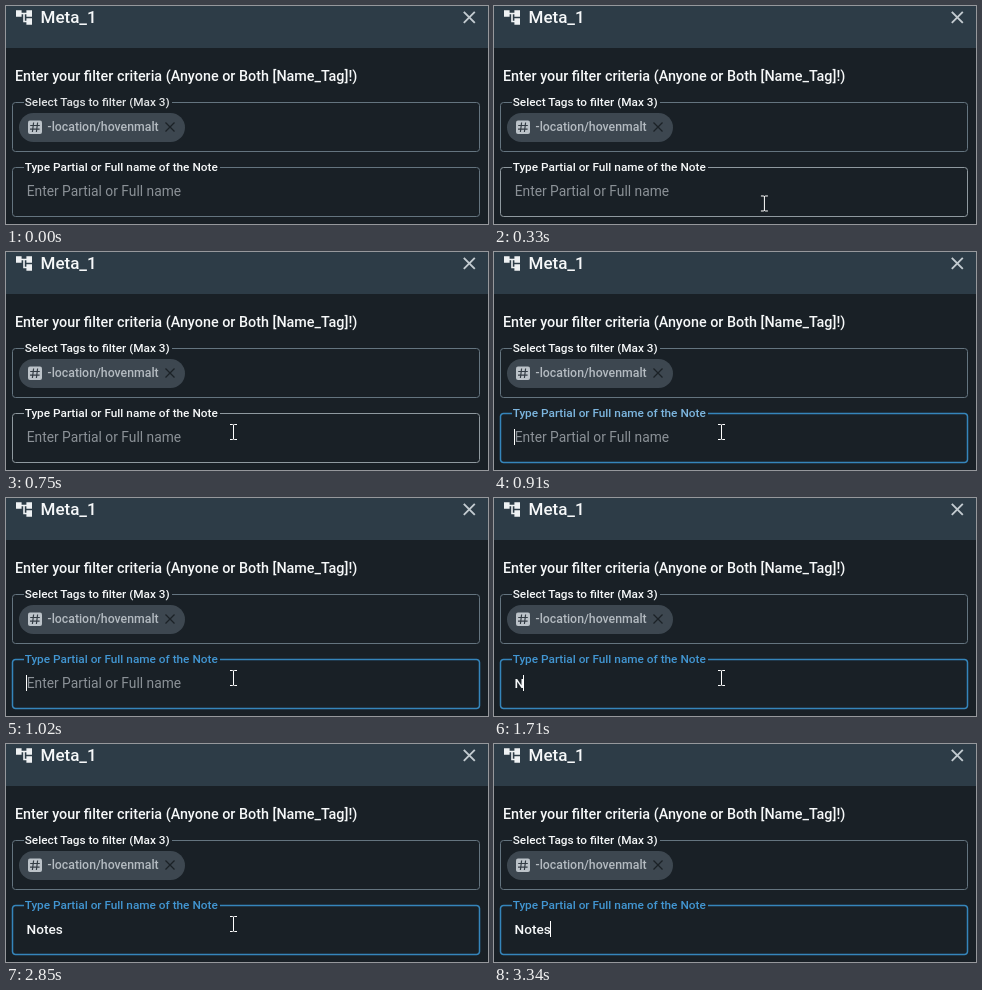
An HTML page that plays this animation: 482 by 218 pixels, repeating every 3.5 s.

```html
<!DOCTYPE html>
<html lang="en">
<head>
<meta charset="utf-8">
<title>Filter dialog</title>
<style>
  html, body { margin: 0; width: 100%; height: 100%; overflow: hidden; background: #192026; }
  svg { display: block; width: 482px; height: 218px; font-family: Roboto, sans-serif; font-weight: 500; }
  text { fill: #f6f8f9; white-space: pre; }
  .label { font-size: 11.8px; }
  .chip { font-size: 12.3px; fill: #b4bbc1; }
  .placeholder { font-size: 13.8px; font-weight: 400; fill: #8b9197; }
  .typed { font-size: 13.6px; }
  .frame { fill: none; stroke: #64747f; }
  .line { fill: none; }
</style>
</head>
<body>
<svg viewBox="0 0 482 218">
  <defs>
    <clipPath id="scrollArea"><rect y="92" width="482" height="126"/></clipPath>
  </defs>
  <rect width="482" height="218" fill="#192026"/>

  <rect width="482" height="42" fill="#2d3c47"/>
  <path transform="translate(8.4 1.9) scale(.8)" fill="#eef1f3"
        d="M22 11V3h-7v3H9V3H2v8h7V8h2v10h4v3h7v-8h-7v3h-2V8h2v3z"/>
  <text x="34.5" y="16.8" font-size="17">Meta_1</text>
  <path class="line" d="M457.8 5.8l11 11m0-11l-11 11" stroke="#c3cbd0" stroke-width="1.9"/>
  <text x="9" y="75" font-size="14.35">Enter your filter criteria (Anyone or Both [Name_Tag]!)</text>

  <g clip-path="url(#scrollArea)">
    <path class="frame" d="M166 96.5H470.5a3 3 0 0 1 3 3V142.5a3 3 0 0 1-3 3H9.5a3 3 0 0 1-3-3V99.5a3 3 0 0 1 3-3H18"/>
    <text id="tagLabel" class="label" x="18.7" y="100">Select Tags to filter (Max 3)</text>
    <rect x="13" y="107" width="166" height="29" rx="14.5" fill="#3d4750"/>
    <rect x="22" y="114.5" width="14" height="13.5" rx="2" fill="#bcc3c9"/>
    <path class="line" d="M27.6 116.5l-1.2 9.5m5.2-9.5l-1.2 9.5M24.2 119.5h9.6m-9.8 3.6h9.6" stroke="#343d45" stroke-width="1.2"/>
    <text class="chip" x="41.6" y="125.3">-location/hovenmalt</text>
    <path class="line" d="M159.5 116.5l9 9m0-9l-9 9" stroke="#1b2126" stroke-width="1.3"/>
  </g>

  <path id="nameFrame" class="frame" d="M214 161.5H470.5a3 3 0 0 1 3 3V207.5a3 3 0 0 1-3 3H9.5a3 3 0 0 1-3-3V164.5a3 3 0 0 1 3-3H18"/>
  <text id="nameLabel" class="label" x="18.7" y="165">Type Partial or Full name of the Note</text>
  <text id="placeholder" class="placeholder" x="20.7" y="190">Enter Partial or Full name</text>
  <text id="typed" class="typed" x="20.5" y="190"></text>
  <rect id="caret" y="177" width="1" height="16" fill="#fff"/>
  <path id="pointer" class="line" stroke="#fff"
        d="M-3.5-7.5h2.5q1 0 1 1q0-1 1-1h2.5M0-7V7M-3.5 7.5h2.5q1 0 1-1q0 1 1 1h2.5"/>
</svg>
<script>
const LOOP = 3500;
const HOVER = 300, FOCUS = 830, FADE = 190, TYPE = 1710, LEAVE = 2970, GONE = 3070;
const BLINK = 514;
const WORD = 'Notes';

const enter = [274, 214], bend = [262, 145], rest = [227.5, 180], exit = [284.5, 198];
const white = [246, 248, 249], blue = [66, 150, 210];

const $ = id => document.getElementById(id);
const show = (el, visible) => el.setAttribute('visibility', visible ? 'visible' : 'hidden');
const progress = (t, start, length) => Math.min(1, Math.max(0, (t - start) / length));
const easeOut = k => 1 - (1 - k) ** 2;
const mix = (a, b, k) => a.map((v, i) => v + (b[i] - v) * k);

// Typing speeds up slightly with each letter.
const keyTime = i => TYPE + 220 * i - 17.5 * i * i;

function pointerAt(t) {
  if (t >= LEAVE) return mix(rest, exit, progress(t, LEAVE, 60));
  const k = easeOut(progress(t, HOVER, 450));
  return mix(mix(enter, bend, k), mix(bend, rest, k), k);
}

function render(t) {
  const focused = t >= FOCUS;
  $('nameFrame').style.stroke = focused ? '#3585bb' : t >= HOVER ? '#8f999f' : '#64747f';
  $('nameFrame').style.strokeWidth = focused ? 1.5 : 1;
  $('nameLabel').style.fill = `rgb(${mix(white, blue, easeOut(progress(t, FOCUS, FADE))).map(Math.round)})`;
  $('tagLabel').style.opacity = t < 40 ? .9 : 1;

  const typed = [...WORD].filter((_, i) => t >= keyTime(i)).join('');
  $('typed').textContent = typed;
  show($('placeholder'), !typed);

  // Every key press restarts the blinking.
  const lastInput = typed ? keyTime(typed.length - 1) : FOCUS + 75;
  const phase = Math.floor((t - lastInput) / BLINK);
  const end = typed ? $('typed').getComputedTextLength() : 0;
  $('caret').setAttribute('x', 20 + Math.floor(end));
  show($('caret'), phase >= 0 && phase % 2 === 0);

  show($('pointer'), t >= HOVER && t < GONE);
  $('pointer').setAttribute('transform', `translate(${pointerAt(t)})`);
}

const begin = performance.now();
function tick() {
  render((performance.now() - begin) % LOOP);
  requestAnimationFrame(tick);
}
tick();
</script>
</body>
</html>
```
